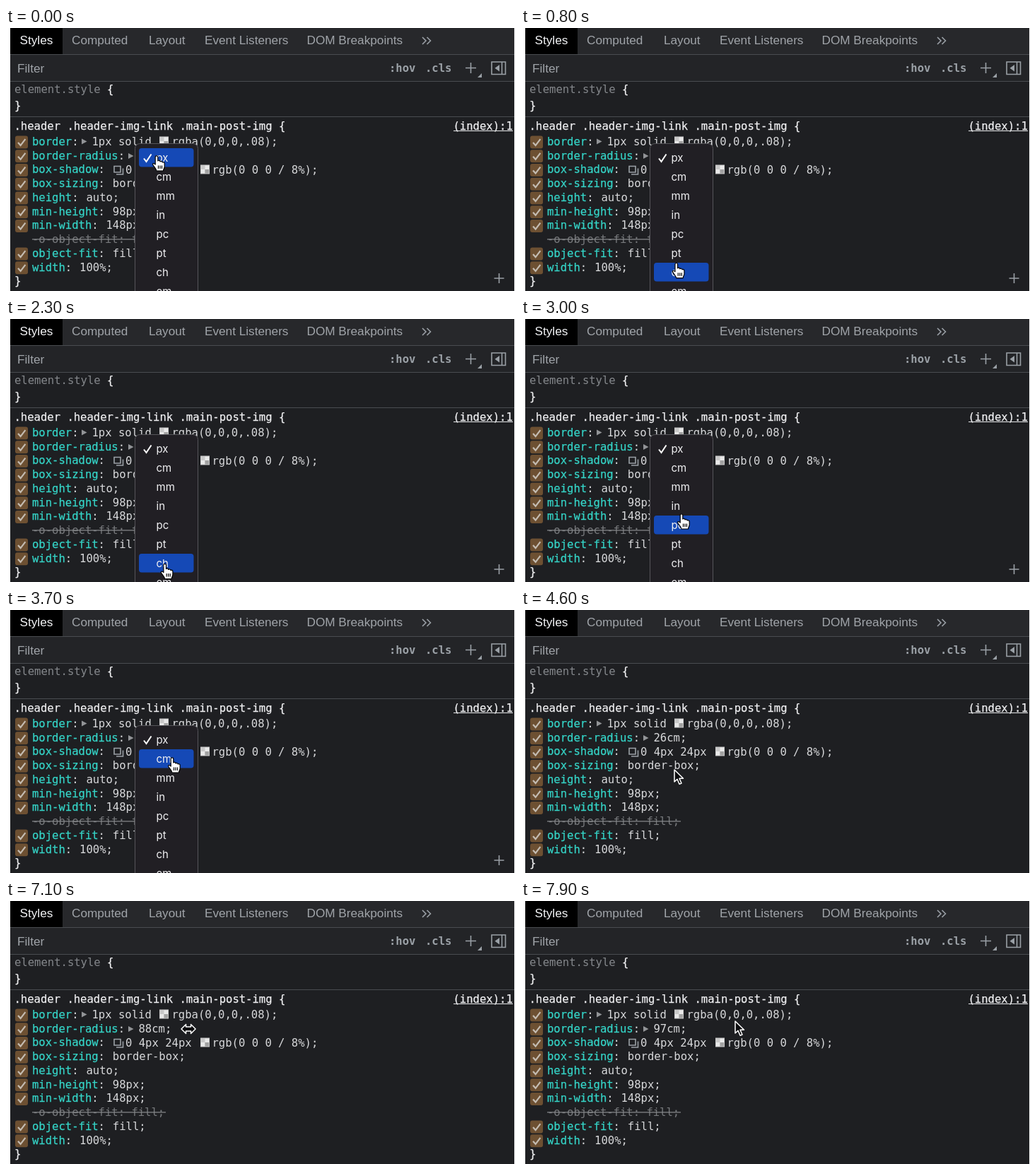
Write an HTML page that moves like this. It is 720 by 372 pixels and loops after 8 s.

```html
<!DOCTYPE html>
<html lang="en">
<head>
<meta charset="utf-8">
<title>Styles pane</title>
<style>
  html, body { margin: 0; width: 100%; height: 100%; overflow: hidden; background: #fff; }
  svg { display: block; }
  text { white-space: pre; }
  .mono { font: 15.56px "DejaVu Sans Mono", "Liberation Mono", monospace; fill: #d8d9db; }
  .strong { fill: #f0f0f2; stroke: #f0f0f2; stroke-width: .25; }
  .ui { font: 17.2px "Liberation Sans", Arial, sans-serif; fill: #a0a4a9; }
  .unit { font: 15px Inter, Roboto, sans-serif; fill: #f1f1f3; }
  .prop { fill: #35d4c7; stroke: #35d4c7; stroke-width: .25; }
  .line { stroke: #494c50; }
  .icon { fill: none; stroke: #9aa0a6; stroke-width: 1.6; }
  .cursor { fill: #fff; stroke: #000; stroke-width: 1.2; stroke-linejoin: round; }
  .dark { fill: #0c0c0e; stroke: #fff; stroke-width: 1.5; }
</style>
</head>
<body>
<svg id="stage" width="720" height="372" viewBox="0 0 720 372"></svg>
<script>
const LOOP = 8000, STEP = 100, MENU_CLOSES = 4100;
const ROW_TOP = 170, ROW_HEIGHT = 27;
const stage = document.getElementById('stage');

function add(tag, attrs, parent = stage, content = '') {
  const el = document.createElementNS('http://www.w3.org/2000/svg', tag);
  for (const key in attrs) el.setAttribute(key, attrs[key]);
  el.textContent = content;
  parent.appendChild(el);
  return el;
}
const rect = (x, y, width, height, fill, more = {}, parent = stage) =>
  add('rect', { x, y, width, height, fill, ...more }, parent);
const text = (x, y, content, cls = 'mono', more = {}, parent = stage) =>
  add('text', { x, y, class: cls, ...more }, parent, content);
const path = (d, more, parent = stage) => add('path', { d, ...more }, parent);
const rule = y => path(`M6 ${y}H719`, { class: 'line' });

function swatch(x, y) {
  rect(x, y, 13, 13, '#c9c9c9');
  path(`M${x + 1} ${y + 6.5}h5.5v5.5h-5.5zM${x + 6.5} ${y + 1}h5.5v5.5h-5.5z`, { fill: '#e9e9e9' });
  path(`M${x + 6.5} ${y + 6.5}h5.5v5.5h-5.5z`, { fill: '#a2a2a2' });
}
const expander = (x, y) => path(`M${x} ${y - 4}l7.5 4l-7.5 4z`, { fill: '#929497' });

function checkbox(y) {
  rect(13, y - 8, 18, 18, '#6d5032', { rx: 3 });
  path(`M17 ${y + 1.5}l3.6 4l6.8-9`, { fill: 'none', stroke: '#c4bcb2', 'stroke-width': 2.2 });
}

function drawToolbar() {
  rect(6, 0, 713, 372, '#1e1f22');
  rect(6, 0, 713, 37, '#27282b');
  rect(6, 0, 74, 37, '#000');
  rect(6, 38, 713, 37, '#232427');
  [37.5, 75.5, 125.5].forEach(rule);
  text(19.5, 23, 'Styles', 'ui', { style: 'fill:#f5f6f8' });
  text(93, 23, 'Computed', 'ui');
  text(202, 23, 'Layout', 'ui');
  text(281, 23, 'Event Listeners', 'ui');
  text(425.5, 23, 'DOM Breakpoints', 'ui');
  path('M589 13l5 5l-5 5M595.500 13l5 5l-5 5', { class: 'icon' });
  text(16, 63, 'Filter', 'ui');
  const bold = { style: 'fill:#9aa0a6;font-weight:bold' };
  text(542, 62, ':hov', 'mono', bold);
  text(593, 62, '.cls', 'mono', bold);
  path('M650 56.500h15M657.500 49v15', { class: 'icon' });
  path('M673 64v6h-6z', { fill: '#9aa0a6' });
  path('M687 48h19.500v17.500h-19.500zM701.500 48v17.500', { class: 'icon' });
  path('M698 52v9.500l-6.500-4.750z', { fill: '#9aa0a6' });
}

function drawRules() {
  text(12, 92, 'element.style', 'mono', { style: 'fill:#85888c' });
  text(143, 92, '{', 'mono strong');
  text(12, 114.5, '}', 'mono strong');
  text(11.5, 143.5, '.header .header-img-link .main-post-img {', 'mono strong');
  text(632.5, 143.5, '(index):1', 'mono strong');
  path('M633 145.500H717', { stroke: '#e4e5e7' });
  text(12, 362.5, '}', 'mono strong');

  const rows = [['border'], ['border-radius'], ['box-shadow'], ['box-sizing', 'border-box'],
    ['height', 'auto'], ['min-height', '98px'], ['min-width', '148px'], null,
    ['object-fit', 'fill'], ['width', '100%']];
  rows.forEach((row, i) => {
    const y = 160.6 + 19.75 * i;
    if (!row) {
      text(37, y + 5.3, '-o-object-fit: fill;', 'mono', { style: 'fill:#77797c' });
      path(`M37 ${y}H226`, { stroke: '#85878a', 'stroke-width': 1.2 });
      return;
    }
    checkbox(y);
    const line = text(37, y + 5.3, '');
    add('tspan', { class: 'prop' }, line, row[0]);
    add('tspan', {}, line, ':');
    if (row[1]) add('tspan', { dx: 1.5 }, line, ` ${row[1]};`);
  });

  expander(107, 160.5);
  text(121.5, 165.5, '1px solid');
  swatch(217, 153.5);
  text(234.5, 165.5, 'rgba(0,0,0,.08);');
  expander(173, 181);
  path('M153 195.500h9v8.500h-9zM156 207h9.500v-8.500', { class: 'icon' });
  text(169, 205.5, '0 4px 24px');
  swatch(275, 193.5);
  text(291.5, 205.5, 'rgb(0 0 0 / 8%);');
}

drawToolbar();
drawRules();
const radius = text(187.5, 186, '');

// Everything that disappears when a unit is picked.
const menu = add('g', {});
path('M690.500 354h14M697.500 347v14', { class: 'icon' }, menu);
rect(182.5, 163.5, 89, 230, '#211f24', { rx: 7, stroke: '#56555a' }, menu);
const highlight = rect(188, ROW_TOP, 77.5, ROW_HEIGHT - 0.5, '#1549b6', { rx: 4 }, menu);
['px', 'cm', 'mm', 'in', 'pc', 'pt', 'ch', 'em'].forEach((unit, i) =>
  text(212.5, 188.5 + ROW_HEIGHT * i, unit, 'unit', {}, menu));
path('M195 184.500l3.500 4.500l7-10.500', { fill: 'none', stroke: '#fff', 'stroke-width': 2 }, menu);

// Each cursor has its hot spot at 0,0.
const cursors = {
  hand: path('M-1.800 1.500C-1.800-.7 1.700-.7 1.800 1.500V7C2.500 6 5 6.200 5 8C6 7 8 7.500 8.200 9' +
    'C9.500 8.300 11.200 9 11.200 10.500V15C11.200 17 9.500 18.500 9.500 21H0C-.5 18-3.500 15.500-5.200 12.500' +
    'C-6 10.500-3.800 9.700-1.800 12ZM2.500 13.500V18M5 13.500V18M7.500 13.500V18', { class: 'cursor' }),
  arrow: path('M0 0V17L4 13.300L7 20.300L10 19L7 12.300H12.500Z', { class: 'cursor dark' }),
  resize: path('M-10 0L-3.500-6.500V-3H3.500V-6.500L10 0L3.500 6.500V3H-3.500V6.500Z', { class: 'cursor dark' }),
};

// time, x, y
const route = [
  [0, 213, 181], [600, 219, 346], [900, 220, 328], [1500, 220, 284], [1800, 221, 290],
  [2400, 225, 351], [2700, 226, 346], [3000, 227, 276], [3700, 235, 209], [4100, 235, 209],
  [4600, 217, 226], [5000, 228, 300], [5400, 225, 268], [5600, 225, 268], [6000, 196, 181],
  [6400, 196, 181], [7300, 267, 181], [7500, 267, 181], [7900, 303, 170], [LOOP, 303, 170],
];
const ease = p => p * p * (3 - 2 * p);

function pointerAt(t) {
  const i = route.findIndex(stop => stop[0] > t);
  const [t0, x0, y0] = route[i - 1], [t1, x1, y1] = route[i];
  const p = ease((t - t0) / (t1 - t0));
  return [x0 + (x1 - x0) * p, y0 + (y1 - y0) * p];
}

function draw(t) {
  const [x, y] = pointerAt(t);
  const open = t < MENU_CLOSES;
  const dragging = t >= 5900 && t < 7600;
  const kind = open ? 'hand' : dragging ? 'resize' : 'arrow';
  for (const name in cursors) {
    cursors[name].setAttribute('display', name === kind ? 'inline' : 'none');
  }
  cursors[kind].setAttribute('transform', `translate(${x} ${y})`);

  menu.setAttribute('display', open ? 'inline' : 'none');
  const row = Math.floor((y + 3 - ROW_TOP) / ROW_HEIGHT);
  highlight.setAttribute('y', ROW_TOP + ROW_HEIGHT * row);

  const drag = ease(Math.min(1, Math.max(0, (t - 6400) / 900)));
  radius.textContent = `${26 + Math.round(71 * drag)}${open ? 'px' : 'cm'};`;
}

const start = performance.now();
function tick(now) {
  const t = Math.max(0, now - start) % LOOP;
  draw(Math.floor(t / STEP) * STEP);
  requestAnimationFrame(tick);
}
draw(0);
requestAnimationFrame(tick);
</script>
</body>
</html>
```
